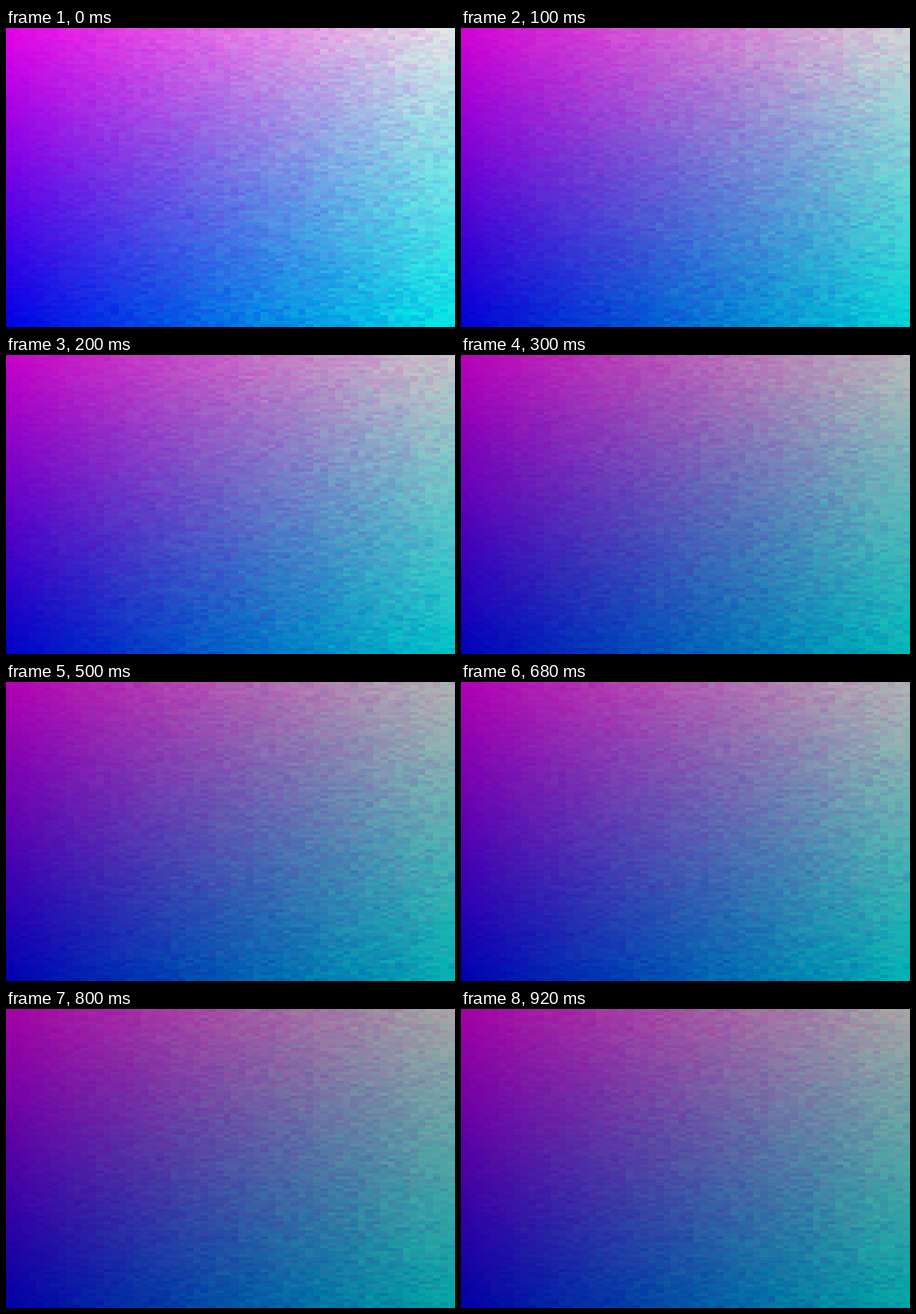
An HTML page with a canvas that plays this animation: 450x300 px, repeating every 1000 ms.

```html
<!DOCTYPE html>
<html lang="en">
<head>
<meta charset="utf-8">
<title>Dimming gradient</title>
<style>
  html, body { margin: 0; width: 100%; height: 100%; overflow: hidden; }
  canvas { display: block; }
</style>
</head>
<body>
<canvas id="stage" width="450" height="300"></canvas>
<script>
const W = 450, H = 300, CELL_W = 7.5, CELL_H = 3, LOOP = 1000;
const ctx = document.getElementById('stage').getContext('2d');

// Start time in ms and brightness of each step
const steps = [[0, 229], [100, 213], [200, 199], [300, 185], [500, 178], [800, 165]];

function makeRandom(seed) {
  return () => {
    seed = (Math.imul(seed, 1664525) + 1013904223) >>> 0;
    return seed / 4294967296;
  };
}

function draw(step) {
  const level = steps[step][1];
  const random = makeRandom(7919 * (step + 1));
  const jitter = amount => (random() + random() - 1) * amount;
  const channel = value => Math.round(level * Math.min(1, Math.max(0, value)));

  for (let y = 0; y < H; y += CELL_H) {
    for (let x = 0; x < W; x += CELL_W) {
      const u = (x + CELL_W / 2) / W;
      const v = (y + CELL_H / 2) / H;
      // Grain grows towards the right
      const red = 1 - v + jitter(0.03 + 0.06 * u);
      const green = u + jitter(0.12 * Math.sqrt(u));
      const left = Math.round(x), right = Math.round(x + CELL_W);
      ctx.fillStyle = `rgb(${channel(red)}, ${channel(green)}, ${level})`;
      ctx.fillRect(left, y, right - left, CELL_H);
    }
  }
}

let shown = -1;
const start = performance.now();

function frame() {
  const time = (performance.now() - start) % LOOP;
  const step = steps.filter(([from]) => from <= time).length - 1;
  if (step !== shown) draw(shown = step);
  requestAnimationFrame(frame);
}
frame();
</script>
</body>
</html>
```
